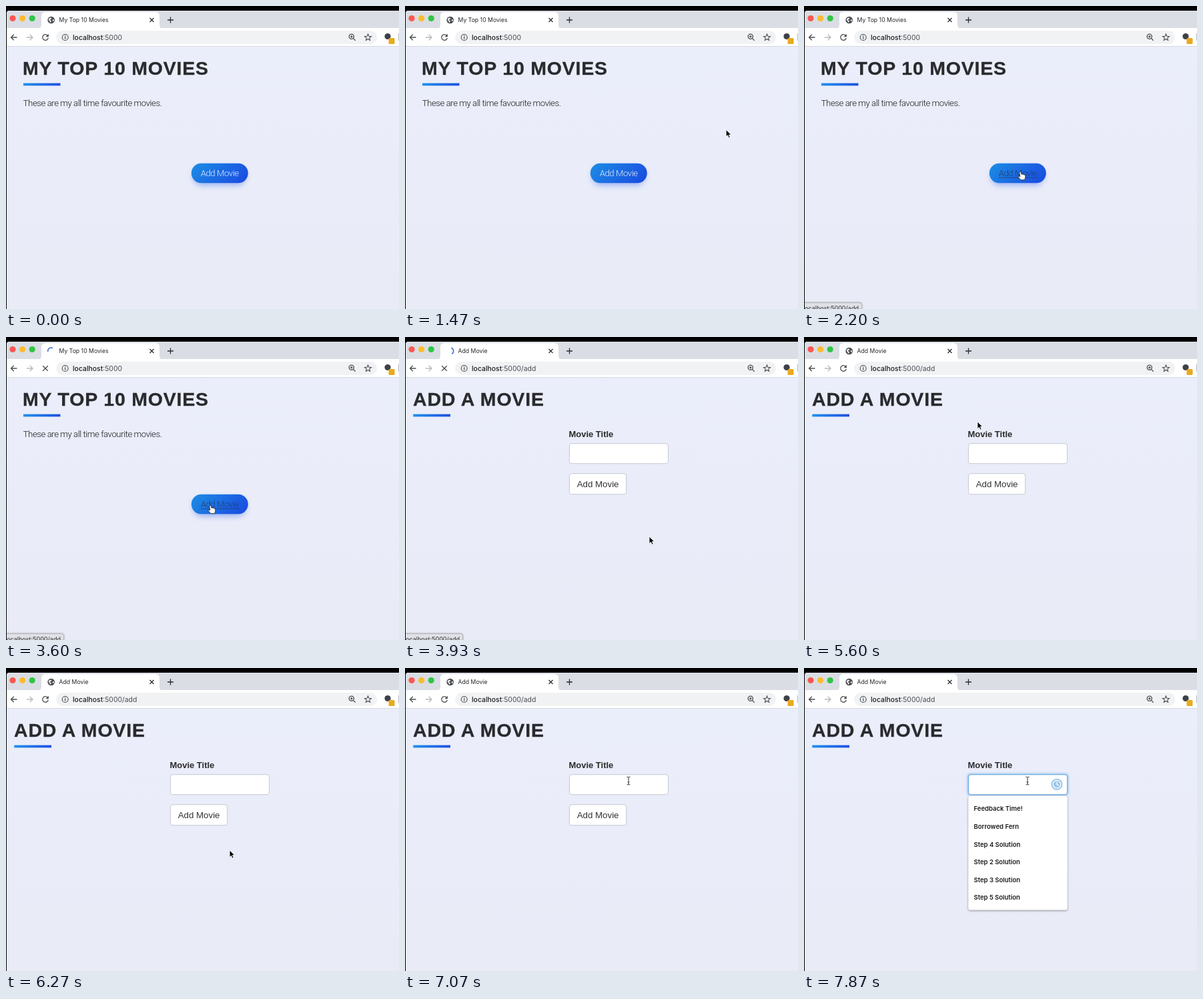
These frames come from a looping animation (589 px wide and 454 px high, 8 s). An HTML page:

```html
<!DOCTYPE html>
<html lang="en">
<head>
<meta charset="utf-8">
<title>Movie list</title>
<style>
  html, body { margin: 0; width: 100%; height: 100%; overflow: hidden; background: #000; }
  svg { display: block; width: 100vw; height: 100vh; }
  text { white-space: pre; }
  .ui { font-family: Inter, "Open Sans", sans-serif; fill: #303134; }
  .tab { font-size: 8.7px; fill: #25272a; }
  .url { font-size: 10.4px; fill: #494d52; }
  .host { fill: #1b1d20; font-weight: 500; }
  .head { font: bold 28.5px "Liberation Sans", Arial, sans-serif; letter-spacing: .8px; fill: #292a2d; stroke: #292a2d; stroke-width: .3; }
  .thin { font: 300 13.2px Roboto, "Liberation Sans", sans-serif; letter-spacing: -.45px; fill: #1c1c1e; }
  .label { font: bold 13px "Liberation Sans", Arial, sans-serif; fill: #2b2b2b; }
  .btn { font: 13.3px "Liberation Sans", Arial, sans-serif; fill: #333; }
  .option { font-size: 9.5px; font-weight: 600; fill: #1c1c1e; }
  .line { fill: none; stroke: #4a4d51; stroke-width: 1.3; }
  .dark { stroke: #2b2d30; }
  .pale { stroke: #b6b8bb; }
</style>
</head>
<body>
<svg viewBox="0 0 589 454" preserveAspectRatio="none">
  <defs>
    <linearGradient id="page" x2="0" y2="1">
      <stop stop-color="#ebeefb"/><stop offset="1" stop-color="#e9ebf7"/>
    </linearGradient>
    <linearGradient id="bar"><stop stop-color="#2090ea"/><stop offset="1" stop-color="#1d4fe0"/></linearGradient>
    <linearGradient id="blue" gradientUnits="userSpaceOnUse" x1="290" y1="222" x2="350" y2="279">
      <stop stop-color="#1c8ee4"/><stop offset="1" stop-color="#1a48e0"/>
    </linearGradient>
    <filter id="soft" x="-30%" y="-60%" width="160%" height="220%"><feGaussianBlur stdDeviation="4"/></filter>
    <filter id="near" x="-20%" y="-20%" width="140%" height="140%"><feGaussianBlur stdDeviation="1.5"/></filter>
  </defs>

  <!-- window -->
  <rect width="589" height="454"/>
  <path d="M1 454V11Q1 7 5 7H589V454Z" fill="url(#page)"/>
  <path d="M1 34V11Q1 7 5 7H589V34Z" fill="#dadde3"/>
  <rect x="1" y="33" width="588" height="27" fill="#fff"/>
  <rect x="1" y="60" width="588" height="1" fill="#d5d8de"/>
  <path d="M48 33.5Q53 33.5 53 28V15Q53 9 59 9H224Q230 9 230 15V28Q230 33.5 235 33.5Z" fill="#fff"/>
  <circle cx="10" cy="18.5" r="4.6" fill="#fb5751"/>
  <circle cx="24.6" cy="18.5" r="4.6" fill="#fcbb2d"/>
  <circle cx="39.2" cy="18.5" r="4.6" fill="#31c546"/>
  <path class="line dark" d="M215.5 18l6 6m0-6l-6 6M246.5 16.5v9m-4.5-4.5h9"/>

  <g id="globe">
    <circle cx="67.7" cy="21" r="5.3" fill="#4a4d51"/>
    <path d="M64.2 18.8l2.6-1.4 1.6.8-.9 1.5-1.6.5.3 1.3 1.7.6-.5 1.9-1.3.8-.6-2.3-1.6-1.5ZM70 20.4l1.6-.5.3 2-1.1 1.2-1-1.3Z" fill="#fff"/>
  </g>
  <path id="spin" d="M69.4 16.3A5 5 0 0 1 70.2 25.3" fill="none" stroke="#3b6fd4" stroke-width="1.5"/>
  <text class="ui tab" id="tabName" x="79.5" y="24.2"></text>

  <!-- toolbar -->
  <path class="line" d="M16.5 47H7.5M11.8 42.7L7.5 47l4.3 4.3"/>
  <path class="line pale" d="M31 47h9M35.7 42.7L40 47l-4.3 4.3"/>
  <g id="reload">
    <path class="line" d="M62.3 44.1A4.3 4.3 0 1 0 63.3 48"/>
    <path d="M63.9 41.8v4.4h-4.4Z" fill="#4a4d51"/>
  </g>
  <path class="line" id="stop" d="M55.2 43.2l7.6 7.6m0-7.6l-7.6 7.6"/>
  <rect x="75" y="37" width="481" height="20" rx="10" fill="#f0f2f4"/>
  <circle class="line" cx="88.7" cy="47" r="4.5" style="stroke-width:1.1"/>
  <path class="line" d="M88.7 46.3v3.2M88.7 44.2v1.2"/>
  <text class="ui url" x="100" y="50.7"><tspan class="host">localhost</tspan>:5000<tspan id="path"></tspan></text>
  <circle class="line" cx="517.8" cy="45.8" r="3.6"/>
  <path class="line" d="M520.4 48.4l3.3 3.3M516 45.8h3.6M517.8 44v3.6"/>
  <path id="star" class="line" style="stroke-width:1.1"/>
  <circle cx="572" cy="45.5" r="4.6" fill="#3d4148"/>
  <rect x="573.5" y="48" width="9" height="9" rx="1.5" fill="#e8ab1f"/>
  <rect x="588" y="41" width="1" height="11" fill="#b5b8bc"/>

  <!-- list page -->
  <g id="list">
    <text class="head" x="25" y="103">MY TOP 10 MOVIES</text>
    <rect x="26" y="115.6" width="55.5" height="3.8" fill="url(#bar)"/>
    <text class="thin" x="25.7" y="150.4">These are my all time favourite movies.</text>
    <rect x="280" y="241" width="80" height="28" rx="14" fill="#2f62e8" opacity=".4" filter="url(#soft)"/>
    <rect x="277.8" y="235.7" width="85" height="29.5" rx="14.7" fill="url(#blue)"/>
    <text class="thin" id="link" x="291.7" y="255.3">Add Movie</text>
    <rect id="under" x="292" y="256.8" width="57.5" height=".8" fill="#20406f"/>
  </g>

  <!-- form page -->
  <g id="form">
    <text class="head" x="12" y="103">ADD A MOVIE</text>
    <rect x="12.3" y="115.6" width="55.7" height="3.8" fill="url(#bar)"/>
    <text class="label" x="245.4" y="150.3">Movie Title</text>
    <rect id="glow" x="244.5" y="158" width="152" height="33.5" rx="5" fill="#66afe9" filter="url(#near)"/>
    <rect x="246.4" y="159.7" width="148.2" height="30" rx="3.5" fill="#fff" stroke="#c6c8cf"/>
    <rect id="ring" x="246.4" y="159.7" width="148.2" height="30" rx="3.5" fill="none" stroke="#5fa9e4"/>
    <rect id="caret" x="258.4" y="167.5" width="1" height="15" fill="#222"/>
    <g id="clock" fill="none" stroke="#fff" stroke-width="1.2">
      <circle cx="379" cy="174.3" r="8.6" fill="#a0c8e8" stroke="none"/>
      <circle cx="379" cy="174.3" r="5.9"/>
      <path d="M379 170.3v4.2l3 1.5"/>
    </g>
    <rect x="246.4" y="204.7" width="85.3" height="31" rx="3.5" fill="#fff" stroke="#c6c8cf"/>
    <text class="btn" x="257.7" y="224.8">Add Movie</text>
    <g id="menu">
      <rect x="246" y="193" width="149" height="171" rx="3" opacity=".35" filter="url(#near)"/>
      <rect x="246" y="191.5" width="149" height="171.3" rx="3" fill="#fff" stroke="#c9cbd2" stroke-width=".6"/>
    </g>
  </g>

  <g id="status">
    <path d="M0 444.6H83Q86.6 444.6 86.6 448V454H0Z" opacity=".4" filter="url(#near)"/>
    <path d="M0 444.6H83Q86.6 444.6 86.6 448V454H0Z" fill="#dfe1e6" stroke="#aeb1b7" stroke-width=".9"/>
    <text class="ui" x="1" y="455.8" font-size="9.05">ocalhost:5000/add</text>
  </g>
  <rect y="6" width="1" height="448"/>

  <!-- pointers, hot spot at 0,0 -->
  <path id="arrow" d="M0 0V10.4L2.4 8.2 4.1 12 6 11.2 4.3 7.5H7.6Z" stroke="#fff" stroke-width=".8"/>
  <path id="hand" d="M-1.2 .8Q0-.8 1 .8L2 4.2 3.2 3.7 4.2 4.4 5.4 4.2 6.2 5 7.4 5.2Q8.3 7 7.6 9.4L6.6 12.6H.8L-2.8 8.3Q-3.4 6.6-1.6 7L-.2 8Z" fill="#fff" stroke="#222" stroke-width=".8"/>
  <g id="beam" fill="none">
    <path d="M-2.5-6Q0-6 0-4.5Q0-6 2.5-6M0-4.5V4.5M-2.5 6Q0 6 0 4.5Q0 6 2.5 6M-1.4 2h2.8" stroke="#fff" stroke-width="2"/>
    <path d="M-2.5-6Q0-6 0-4.5Q0-6 2.5-6M0-4.5V4.5M-2.5 6Q0 6 0 4.5Q0 6 2.5 6M-1.4 2h2.8" stroke="#333"/>
  </g>
</svg>
<script>
const LOOP = 8000, TICK = 200 / 3;
const el = {};
document.querySelectorAll('[id]').forEach(n => el[n.id] = n);

// time, x, y of the pointer
const route = [
  [1333, 504, 172], [1600, 440, 208], [1867, 352, 246], [2133, 330, 249], [2200, 324, 248],
  [2333, 323, 249], [2467, 323, 249], [2667, 306, 252], [3600, 306, 252], [3933, 366, 299],
  [4333, 418, 315], [4467, 418, 315], [4800, 330, 312], [5133, 234, 172], [5333, 238, 161],
  [5467, 221, 150], [5600, 260, 127], [5800, 360, 135], [5933, 404, 180], [6133, 380, 238],
  [6267, 335, 273], [6467, 264, 230], [6600, 290, 170], [6733, 370, 150], [6867, 433, 168],
  [7067, 335, 169]
];

const slope = (i, k) => (route[i + 1][k] - route[i][k]) / (route[i + 1][0] - route[i][0]);

// Tangent that never overshoots the neighbouring points
function tangent(i, k) {
  if (i === 0 || i === route.length - 1) return 0;
  const a = slope(i - 1, k), b = slope(i, k);
  return a * b <= 0 ? 0 : 2 * a * b / (a + b);
}

function pointer(t) {
  const last = route.length - 1;
  if (t >= route[last][0]) return route[last].slice(1);
  let i = 0;
  while (route[i + 1][0] <= t) i++;
  const h = route[i + 1][0] - route[i][0];
  const u = Math.max(0, (t - route[i][0]) / h), v = 1 - u;
  return [1, 2].map(k =>
    route[i][k] * (1 + 2 * u) * v * v + route[i + 1][k] * (3 - 2 * u) * u * u +
    h * u * v * (tangent(i, k) * v - tangent(i + 1, k) * u));
}

const fade = (t, from, to) => Math.min(1, Math.max(0, (t - from) / (to - from)));
const inside = ([x, y], l, t, r, b) => x >= l && x <= r && y >= t && y <= b;
const show = (node, on) => node.style.opacity = +on;

// fixed details built by rule
el.star.setAttribute('d', 'M' + Array.from({ length: 10 }, (_, i) => {
  const a = i * Math.PI / 5 - Math.PI / 2, r = i % 2 ? 2.3 : 5.2;
  return (542.5 + r * Math.cos(a)).toFixed(2) + ' ' + (47.2 + r * Math.sin(a)).toFixed(2);
}).join('L') + 'Z');
['Feedback Time!', 'Borrowed Fern', 'Step 4 Solution', 'Step 2 Solution', 'Step 3 Solution', 'Step 5 Solution']
  .forEach((name, i) => {
    const n = document.createElementNS('http://www.w3.org/2000/svg', 'text');
    n.setAttribute('class', 'ui option');
    n.setAttribute('x', 254.5);
    n.setAttribute('y', 214.3 + i * 26.6);
    n.textContent = name;
    el.menu.append(n);
  });

function draw(now) {
  const t = Math.floor((now % LOOP + 4) / TICK) * TICK;
  const added = t >= 3730, loading = t >= 3598 && t < 4195;
  const pos = pointer(t), moving = t >= 1330;
  const hover = moving && !added && inside(pos, 278, 236, 362, 265);
  const typing = added && inside(pos, 246, 159, 395, 190);

  show(el.list, !added);
  show(el.form, added);
  el.tabName.textContent = added ? 'Add Movie' : 'My Top 10 Movies';
  el.path.textContent = added ? '/add' : '';
  show(el.globe, !loading);
  show(el.reload, !loading);
  show(el.spin, loading);
  show(el.stop, loading);
  el.spin.setAttribute('transform', `rotate(${(t - 3933) * .36} 67.7 21)`);

  el.link.style.fill = hover ? '#20406f' : '#e4ecff';
  show(el.under, hover);
  show(el.status, fade(t, 1850, 2130) * (1 - fade(t, 4130, 4330)));

  const focus = fade(t, 7333, 7533);
  show(el.ring, focus);
  show(el.glow, focus * .6);
  show(el.clock, fade(t, 7333, 7467));
  show(el.menu, fade(t, 7467, 7733));
  show(el.caret, t >= 7395 && t < 7862);

  const kind = hover ? 'hand' : typing ? 'beam' : 'arrow';
  for (const name of ['arrow', 'hand', 'beam']) {
    show(el[name], moving && name === kind);
    el[name].setAttribute('transform', `translate(${pos[0].toFixed(2)} ${pos[1].toFixed(2)})`);
  }
}

const start = performance.now();
function tick() {
  draw(performance.now() - start);
  requestAnimationFrame(tick);
}
tick();
</script>
</body>
</html>
```
